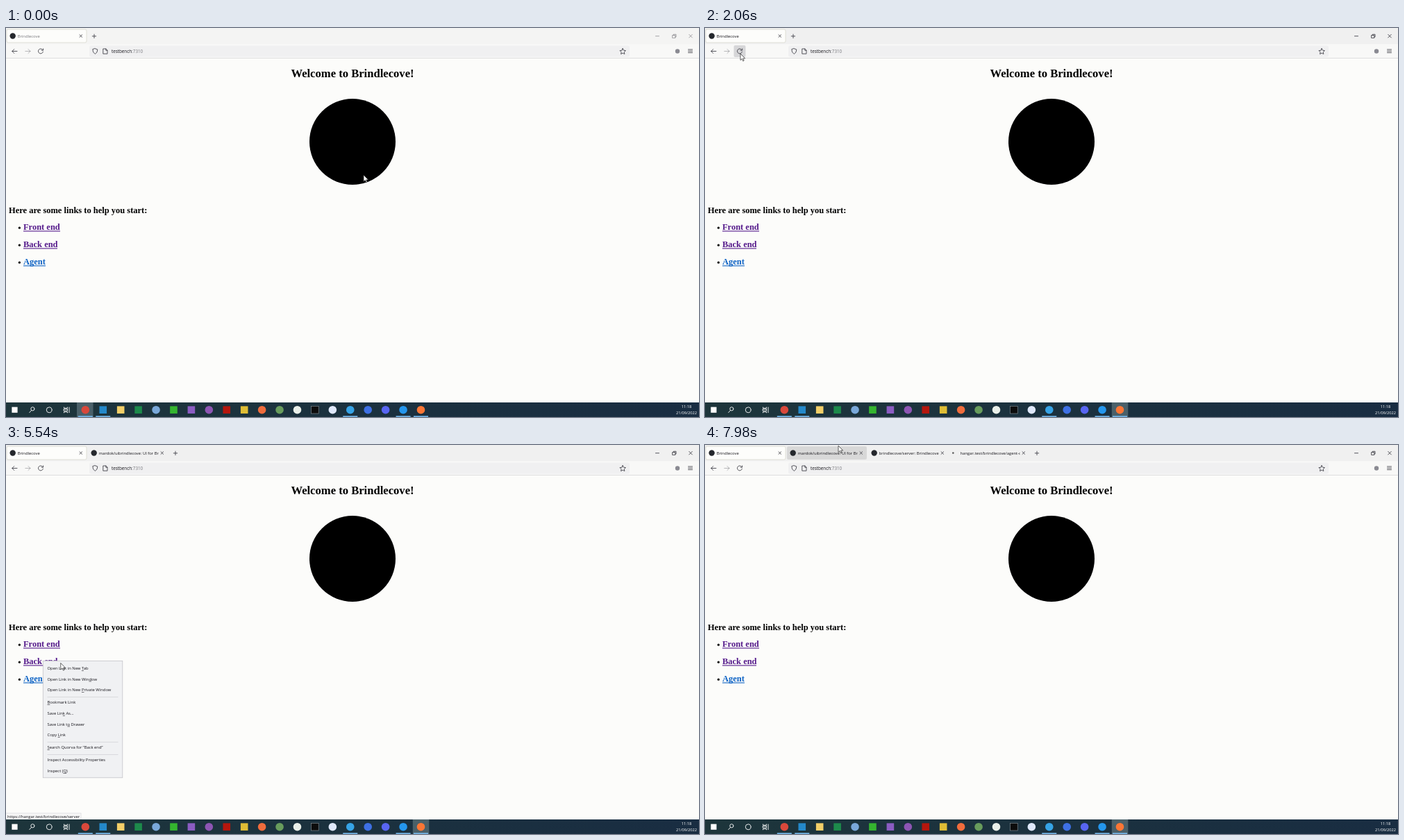
Animation, 998 px wide and 561 px high, one loop 8000 ms. Source, as an HTML page:

```html
<!DOCTYPE html>
<html lang="en">
<head>
<meta charset="utf-8">
<title>Browser demo</title>
<style>
html, body { margin: 0; width: 100%; height: 100%; overflow: hidden; background: #fff; }
svg { display: block; }
#stage { width: 100vw; height: 100vh; }
text { font: 5.85px "Open Sans", "Noto Sans", sans-serif; fill: #15141a; white-space: pre; }
.serif { font: bold 12.47px "Liberation Serif", serif; fill: #000; }
.title { font-size: 16.63px; }
.url { font-size: 6.3px; }
.line { fill: none; stroke: #45444c; stroke-width: .9; stroke-linecap: round; stroke-linejoin: round; }
.white { stroke: #fff; }
.away .tabtext { fill: #77777c; }
.away .controls { opacity: .5; }
.clock { font-size: 5.7px; fill: #fff; text-anchor: middle; }
.key { text-decoration: underline; }
</style>
</head>
<body>
<svg id="stage" viewBox="0 0 998 561">
  <defs>
    <linearGradient id="bar"><stop stop-color="#1d353b"/><stop offset="1" stop-color="#192d42"/></linearGradient>
  </defs>
  <rect width="998" height="561" fill="#fcfcfa"/>
  <g id="page"></g>
  <g id="chrome"></g>
  <g id="status">
    <rect x="-1" y="531" height="10" fill="#f6f6f6" stroke="#d2d2d6" stroke-width=".6"/>
    <text x="2" y="537.5" fill="#333"></text>
  </g>
  <g id="taskbar"></g>
  <g id="menu"></g>
  <g id="cursor">
    <path id="arrow" d="M0 0V9.4L2.2 7.4L3.7 10.7L5.2 10L3.7 6.9H6.7Z" fill="#fff" stroke="#222" stroke-width=".7"/>
    <path id="hand" d="M-1 1Q0 -.8 1 1V4.4Q2.2 3.7 2.7 4.8Q4 4.2 4.4 5.3Q6 5 6 6.6V8.6L4.8 11.6H-.4L-3 7.6Q-3.6 5.8-2 6.2L-1 7.2Z" fill="#fff" stroke="#222" stroke-width=".7"/>
  </g>
</svg>
<script>
const LOOP = 8000;
const $ = id => document.getElementById(id);
const show = (el, on) => el.setAttribute('visibility', on ? 'visible' : 'hidden');
const rect = (x, y, w, h, fill, extra = '') =>
  `<rect x="${x}" y="${y}" width="${w}" height="${h}" fill="${fill}" ${extra}/>`;
const circle = (x, y, r, fill) => `<circle cx="${x}" cy="${y}" r="${r}" fill="${fill}"/>`;
const line = (d, cls = '', extra = '') => `<path class="line ${cls}" d="${d}" ${extra}/>`;
const text = (x, y, s, cls = '', extra = '') => `<text x="${x}" y="${y}" class="${cls}" ${extra}>${s}</text>`;

const site = 'Brindlecove', host = 'hangar.test', user = 'mardok';
const repos = [`${user}/uibrindlecove`, 'brindlecove/server', 'brindlecove/agent-daemon'];

const links = [
  { label: 'Front end', y: 291, w: 53, fill: '#551a8b' },
  { label: 'Back end', y: 316, w: 49, fill: '#551a8b' },
  { label: 'Agent', y: 341, w: 32, fill: '#0c62c4' }
];

const tabs = [
  { open: 0, ready: 0, name: site },
  { open: 4600, ready: 5400, wait: `${host}/${repos[0]}`, name: `${repos[0]}: UI for ${site}` },
  { open: 5800, ready: 7000, wait: `${host}/${repos[1]}`, name: `${repos[1]}: ${site} server` },
  { open: 7150, ready: 9000, wait: `${host}/${repos[2]}`, name: repos[2] }
].map((tab, i) => ({ ...tab, x: 1 + 117 * i }));

const menus = [
  { from: 3700, to: 4600, x: 53, y: 285 },
  { from: 5330, to: 5800, x: 53, y: 311 },
  { from: 6700, to: 7150, x: 54, y: 337 }
];

// time, x, y
const path = [
  [0, 515, 212], [250, 515, 212], [950, 51, 37], [2350, 51, 37], [3000, 52, 285],
  [3900, 52, 285], [4300, 83, 289], [4650, 83, 289], [5050, 53, 311], [5350, 53, 311],
  [5600, 83, 315], [5820, 83, 315], [6200, 55, 336], [6800, 55, 336], [7050, 84, 341],
  [7200, 84, 341], [7800, 192, 1], [8000, 192, 1]
];

function buildPage() {
  $('page').innerHTML =
    text(499, 71, `Welcome to ${site}!`, 'serif title', 'text-anchor="middle"') +
    circle(499, 164, 62, '#000') +
    text(4, 266.5, 'Here are some links to help you start:', 'serif') +
    links.map(l => circle(19.4, l.y - 2.8, 1.6, '#000') +
      text(25, l.y, l.label, 'serif', `style="fill:${l.fill}"`) +
      rect(25, l.y + 1.4, l.w, 1.1, l.fill)).join('');
}

function buildChrome() {
  const cross = x => line(`M${x - 1.8} 9.7l3.6 3.6m0-3.6l-3.6 3.6`, '', 'stroke-width=".7"');
  const tabMarkup = (tab, i) => `<g id="tab${i}">` +
    rect(tab.x, 2, 115, 19, i ? '#d8d8d8' : '#fdfdfb',
      `id="back${i}" rx="2" ${i ? '' : 'stroke="#d8d8cf" stroke-width=".8"'}`) +
    `<g id="icon${i}">${circle(tab.x + 8.7, 11.5, 4.2, '#24272c')}</g>` +
    `<circle id="dot${i}" cy="11.5" r="1.3" fill="#555"/>` +
    `<svg x="${tab.x + 15.7}" y="0" width="86" height="24">${text(0, 13.8, '', 'tabtext', `id="name${i}"`)}</svg>` +
    cross(tab.x + 106.8) + '</g>';
  $('chrome').innerHTML =
    rect(0, 0, 998, 23.5, '#f0f0f0', 'id="strip"') +
    rect(0, 23.5, 998, 20, '#f8f8f7') + rect(0, 43.2, 998, .8, '#d8d8da') +
    tabs.map(tabMarkup).join('') +
    `<g id="plus">${line('M-2.7 11.8h5.4M0 9.1v5.4')}</g>` +
    '<g class="controls">' +
    line('M935.5 11.7h5M960 10.5h3.8v3.8H960zM961.2 10.3V9.2H965v3.8h-1M983.7 9.3l4.6 4.6m0-4.6l-4.6 4.6') + '</g>' +
    rect(120, 25.5, 778, 16, '#f0f0f1', 'rx="2"') +
    rect(41.5, 25, 17, 17, '#d6d6d8', 'rx="2" id="hover"') +
    line('M16 33.5H8.8M11.8 30.5l-3 3l3 3') +
    line('M27.8 33.5H35M32 30.5l3 3l-3 3', '', 'opacity=".4"') +
    line('M53 31.6A3.5 3.5 0 1 0 53.4 34.3M53.6 29.9V32.2H51.2') +
    line('M128.3 29.7L131.8 31Q132 35.5 128.3 37.5Q124.6 35.5 124.8 31Z') +
    line('M140.2 30h3.6l2.2 2.2v5h-5.8zM143.8 30v2.3h2.2') +
    text(152, 36, 'testbench<tspan fill="#77777d">:7310</tspan>', 'url') +
    line('M888.2 29.5l1.3 2.7 2.9.4-2.1 2.1.5 2.9-2.6-1.4-2.6 1.4.5-2.9-2.1-2.1 2.9-.4z') +
    circle(967, 33.5, 3.2, '#8a8a92') +
    line('M982.5 31h6M982.5 33.3h6M982.5 35.6h6');
}

function buildTaskbar() {
  const pitch = 25.43, at = i => 12.6 + pitch * i;
  // The first letter picks the shape: s for square, c for circle.
  const apps = ('c#d9483b s#2489ca s#f3cf68 s#1d8a4b c#79a8d9 s#35b52f s#8b5cc2 c#8d55b3 s#b5160d ' +
    's#dfbd35 c#f06c3c c#689c5c c#e9efe9 s#0c0c0c c#dfe8fb c#36a3e6 c#3e70e4 c#5865f2 c#2496ed c#fb7635').split(' ');
  const icon = (app, i) => {
    const x = at(i + 4), fill = app.slice(1);
    return app[0] === 'c' ? circle(x, 550.7, 5.8, fill)
      : rect(x - 5.3, 545.4, 10.6, 10.6, fill, fill === '#0c0c0c' ? 'stroke="#8b959b" stroke-width=".6"' : '');
  };
  $('taskbar').innerHTML =
    rect(0, 540, 998, 21, 'url(#bar)') +
    rect(102, 540, 23.5, 21, '#4a6069', 'id="active"') +
    [4, 5, 19, 22, 23].map(i => rect(at(i) - 10.5, 559.4, 21, 1.6, '#76b9ed')).join('') +
    rect(8.4, 546.6, 8.2, 8.2, '#fff') +
    line('M36.4 551.6l-2.6 3M41 549.3a2.6 2.6 0 1 1-5.2 0a2.6 2.6 0 1 1 5.2 0', 'white') +
    line('M66.1 550.8a3.9 3.9 0 1 1-7.8 0a3.9 3.9 0 1 1 7.8 0', 'white') +
    line('M83.5 547v1.2h5V547M83.5 554.8v-1.2h5v1.2M83.5 549.6h5v2.4h-5zM91 547v7.6', 'white') +
    apps.map(icon).join('') +
    text(980, 548.3, '11:18', 'clock') + text(980, 557.2, '21/09/2022', 'clock');
}

function buildMenu() {
  // An underscore marks the access key, a dash a divider.
  const rows = ['Open Link in New _Tab', 'Open Link in New Win_dow', 'Open Link in New _Private Window', '-',
    '_Bookmark Link', 'Save Lin_k As...', 'Save Link t_o Drawer', 'Copy _Link', '-',
    '_Search Quorva for “<tspan id="picked"></tspan>”', '-', 'Inspect Accessibility Properties', 'Inspect (_Q)'];
  let y = 13, out = rect(.3, .3, 114.5, 168.5, '#f0f1f3', 'stroke="#c3c3c8" stroke-width=".8"') +
    rect(1, 3.8, 113, 14.6, '#dcdde1', 'id="pick"');
  for (const row of rows) {
    if (row === '-') {
      out += rect(6.5, y - 8, 102, .7, '#cfcfd4');
      y += 2.4;
    } else {
      out += text(6.5, y, row.replace(/_(.)/, '<tspan class="key">$1</tspan>'));
      y += 15.65;
    }
  }
  $('menu').innerHTML = out;
}

function pointerAt(t) {
  const i = path.findIndex(p => p[0] > t), [t0, x0, y0] = path[i - 1], [t1, x1, y1] = path[i];
  const u = (t - t0) / (t1 - t0), e = u * u * (3 - 2 * u);
  return [x0 + (x1 - x0) * e, y0 + (y1 - y0) * e];
}

const linkAt = (x, y) => links.findIndex(l => x >= 25 && x <= 25 + l.w && y > l.y - 11 && y < l.y + 3);

function drawTab(tab, i, t, x, y) {
  const open = t >= tab.open, ready = t >= tab.ready;
  const over = x >= tab.x && x < tab.x + 115 && y < 22;
  show($('tab' + i), open);
  show($('back' + i), open && (!i || over));
  show($('icon' + i), open && ready);
  show($('dot' + i), open && !ready);
  const swing = .5 - .5 * Math.cos((t - tab.open) / 800 * 2 * Math.PI);
  $('dot' + i).setAttribute('cx', tab.x + 5.2 + 7 * swing);
  $('name' + i).textContent = ready ? tab.name : tab.wait;
}

function draw(t) {
  const [x, y] = pointerAt(t);
  const menuIndex = menus.findIndex(m => t >= m.from && t < m.to), menu = menus[menuIndex];
  const link = menu ? menuIndex : linkAt(x, y);
  const focused = t >= 1600;

  $('stage').classList.toggle('away', !focused);
  $('strip').setAttribute('fill', focused ? '#f0f0f0' : '#f4f4f3');
  $('active').setAttribute('x', focused ? 585.8 : 102);
  show($('hover'), x > 41 && x < 59 && y > 25 && y < 42);

  tabs.forEach((tab, i) => drawTab(tab, i, t, x, y));
  const count = tabs.filter(tab => t >= tab.open).length;
  $('plus').setAttribute('transform', `translate(${10 + 117 * count})`);

  const [box, label] = $('status').children;
  show($('status'), link >= 0);
  if (link >= 0) {
    label.textContent = `https://${host}/${repos[link]}`;
    box.setAttribute('width', label.getComputedTextLength() + 5);
  }

  show($('menu'), menu);
  show($('pick'), menu && y > menu.y + 3.5);
  if (menu) {
    $('menu').setAttribute('transform', `translate(${menu.x} ${menu.y})`);
    $('picked').textContent = links[menuIndex].label;
  }

  const hand = !menu && link >= 0;
  show($('hand'), hand);
  show($('arrow'), !hand);
  $('cursor').setAttribute('transform', `translate(${x} ${y})`);
}

buildPage();
buildChrome();
buildTaskbar();
buildMenu();
const start = performance.now();
function tick() {
  draw((performance.now() - start) % LOOP);
  requestAnimationFrame(tick);
}
tick();
</script>
</body>
</html>
```
